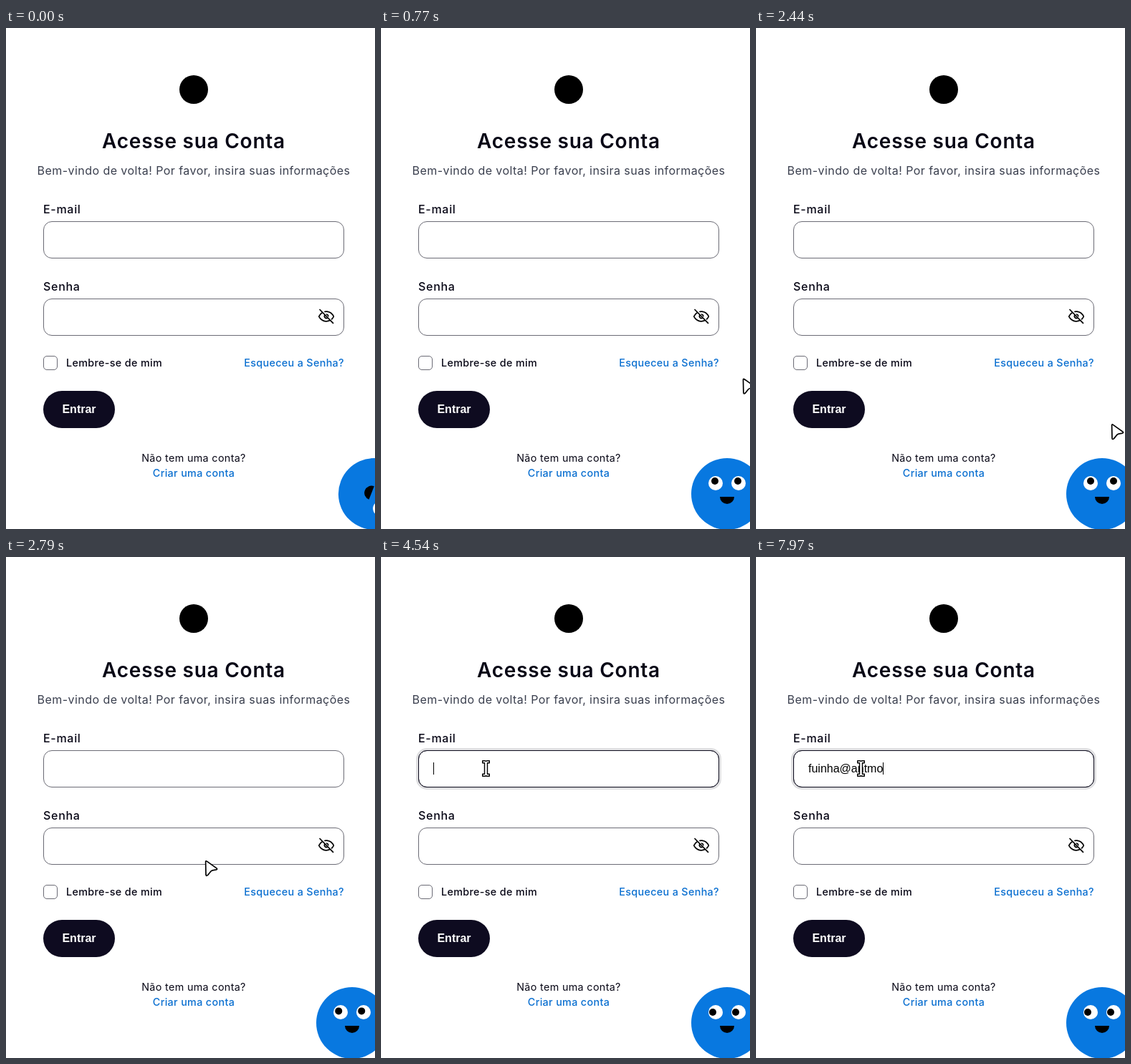
An HTML page that plays this animation: 515 by 700 pixels, repeating every 8000 ms.

```html
<!DOCTYPE html>
<html lang="pt-BR">
<head>
<meta charset="utf-8">
<title>Acesse sua Conta</title>
<style>
  html, body { margin: 0; width: 100%; height: 100%; overflow: hidden; background: #fff; }
  svg { display: block; width: 515px; height: 700px; font-family: Inter, sans-serif; fill: #080716; }
  .mid { text-anchor: middle; }
  .title { font-size: 28px; font-weight: 600; letter-spacing: .75px; }
  .lead { font-size: 16px; fill: #3a3f4e; letter-spacing: .44px; }
  .label { font-size: 16px; font-weight: 500; letter-spacing: .7px; }
  .small { font-size: 14.3px; letter-spacing: .36px; }
  .medium { font-weight: 500; }
  .link { fill: #0a6fd0; font-weight: 500; }
  .arial { font: 16px "Liberation Sans", Arial, sans-serif; }
  .field { fill: #fff; stroke: #6b6b75; }
  .icon { fill: none; stroke: #000; stroke-width: 1.7; stroke-linecap: round; stroke-linejoin: round; }
  .cursor { fill: #fff; stroke: #000; stroke-linejoin: round; }
</style>
</head>
<body>
<svg viewBox="0 0 515 700">
  <circle cx="262" cy="86" r="20" fill="#000"/>
  <text class="mid title" x="262" y="168">Acesse sua Conta</text>
  <text class="mid lead" x="262" y="205">Bem-vindo de volta! Por favor, insira suas informações</text>

  <text class="label" x="52" y="259">E-mail</text>
  <rect id="ring" x="50.5" y="268.5" width="423" height="55" rx="13.5" fill="none" stroke="#dfdfe1" stroke-width="3"/>
  <rect class="field" x="52.5" y="270.5" width="419" height="51" rx="11.5"/>
  <rect id="focus" x="52.5" y="270.5" width="419" height="51" rx="11.5" fill="none" stroke="#0b0a1c"/>
  <text id="typed" class="arial" x="73" y="301" fill="#000"></text>
  <rect id="caret" y="287" width="1" height="17" fill="#000"/>

  <text class="label" x="52" y="367">Senha</text>
  <rect class="field" x="52.5" y="378.5" width="419" height="51" rx="11.5"/>
  <g class="icon" transform="translate(435 391)">
    <path d="M3 2.500L21.500 21.300M13.800 14A2.800 2.800 0 0 1 10 10M12.500 9.200A2.800 2.800 0 0 1 14.800 11.600"/>
    <path d="M6.700 6.400C3.100 8.400 1.700 12 1.700 12S4.500 18.800 12 18.800A11 11 0 0 0 17 17.600M19.600 15.900C21.600 14 22.300 12 22.300 12S19.500 5.200 12 5.200A11.500 11.500 0 0 0 10 5.400"/>
  </g>

  <rect class="field" x="52.5" y="458.5" width="19" height="19" rx="4.5"/>
  <text class="small medium" x="84" y="473">Lembre-se de mim</text>
  <text class="small link" x="472" y="473" text-anchor="end">Esqueceu a Senha?</text>

  <rect x="52" y="507" width="100" height="52" rx="26" fill="#0e0b20"/>
  <text class="mid arial" x="102" y="538" style="font-weight:700" fill="#fff">Entrar</text>

  <text class="mid small" x="262" y="606">Não tem uma conta?</text>
  <text class="mid small link" x="262" y="627">Criar uma conta</text>

  <g id="ball">
    <circle r="50" fill="#0878e0"/>
    <g fill="#fff"><circle cx="-16" cy="-15" r="10"/><circle cx="16" cy="-15" r="10"/></g>
    <g id="pupils" fill="#000"><circle cx="-16" cy="-15" r="5"/><circle cx="16" cy="-15" r="5"/></g>
    <path d="M-10 4H10A10 10 0 0 1 -10 4Z" fill="#000"/>
  </g>

  <path id="arrow" class="cursor" stroke-width="1.7" d="M1 2.5Q1 .6 2.7 1.7L16.3 11.5Q17.800 13 15.800 13.500L10.500 14.500Q9 14.800 8 16L4 21Q1.600 23 1.400 20.500Z"/>
  <path id="beam" class="cursor" stroke-width="1.4" d="M.7.7H4.300L5.500 1.500L6.700.7H10.300V3.700H7.500V19.300H10.300V22.300H6.700L5.500 21.500L4.300 22.300H.7V19.300H3.500V3.700H.7Z"/>
</svg>
<script>
const LOOP = 8000;
const el = id => document.getElementById(id);
const clamp = v => Math.min(1, Math.max(0, v));
const place = (id, x, y, extra = '') => el(id).setAttribute('transform', `translate(${x} ${y})${extra}`);
const show = (id, on) => el(id).style.opacity = +on;

const EMAIL = 'fuinha@antmo';
const KEYS = [4640, 4750, 4860, 5500, 5980, 6170, 7030, 7380, 7480, 7580, 7790, 7970];
const CARET = [[3460, 4020], [4540, 5370], [5500, 6670], [7030, LOOP]];

// [time, x, y]
const ENTER = [[600, 517, 502], [770, 504.5, 489]];
const PATH = [[1350, 504.5, 489], [1500, 472, 503], [1670, 423, 549], [1850, 405, 618], [1990, 397, 636],
  [2150, 428, 632], [2280, 507, 606], [2440, 496, 553], [2700, 338, 456], [2950, 179, 367], [3080, 151, 318], [3210, 141, 284]];
const GAZE = [[1350, -1, -3], [1850, -2.5, 1], [2150, -3.5, 0], [2440, 0, -3], [2950, -4, -1], [3210, -4, 0]];

// Cubic curve through the points, or straight lines when smooth is false
function along(points, t, smooth) {
  const last = points.length - 1;
  if (t <= points[0][0]) return points[0].slice(1);
  if (t >= points[last][0]) return points[last].slice(1);
  const i = points.findIndex(p => p[0] > t) - 1;
  const at = k => points[Math.min(last, Math.max(0, k))];
  const [a, b, c, d] = [at(i - 1), at(i), at(i + 1), at(i + 2)];
  const span = c[0] - b[0], u = (t - b[0]) / span;
  return [1, 2].map(k => {
    if (!smooth) return b[k] + (c[k] - b[k]) * u;
    const m0 = (c[k] - a[k]) / (c[0] - a[0]) * span, m1 = (d[k] - b[k]) / (d[0] - b[0]) * span;
    const e = c[k] - b[k];
    return b[k] + m0 * u + (3 * e - 2 * m0 - m1) * u * u + (m0 + m1 - 2 * e) * u * u * u;
  });
}

// cubic-bezier(.25, .1, .25, 1)
function ease(x) {
  const bez = (p, q, s) => 3 * p * s * (1 - s) ** 2 + 3 * q * s * s * (1 - s) + s ** 3;
  let lo = 0, hi = 1;
  for (let i = 0; i < 24; i++) {
    const s = (lo + hi) / 2;
    if (bez(.25, .25, s) < x) lo = s; else hi = s;
  }
  return bez(.1, 1, lo);
}

function draw(t) {
  const left = 1 - ease(clamp((t + 405) / 1000));
  place('ball', 483 + 100 * left, 651, ` rotate(${360 * left})`);
  place('pupils', ...along(GAZE, t, false));

  const [x, y] = t < 1350 ? along(ENTER, t, false) : along(PATH, t, true);
  const mid = y + 11;
  const inField = x > 52 && x < 462 && (mid > 270 && mid < 322 || mid > 378 && mid < 430);
  place('arrow', x, y);
  place('beam', x, y);
  show('arrow', t > 600 && !inField);
  show('beam', inField);

  const focus = ease(clamp((t - 3430) / 230));
  el('ring').style.opacity = el('focus').style.opacity = focus;

  const typed = el('typed');
  typed.textContent = EMAIL.slice(0, KEYS.filter(k => k <= t).length);
  el('caret').setAttribute('x', Math.floor(73 + typed.getComputedTextLength()));
  show('caret', CARET.some(([on, off]) => t >= on && t < off));
}

const start = performance.now();
function tick() {
  draw((performance.now() - start) % LOOP);
  requestAnimationFrame(tick);
}
tick();
</script>
</body>
</html>
```
